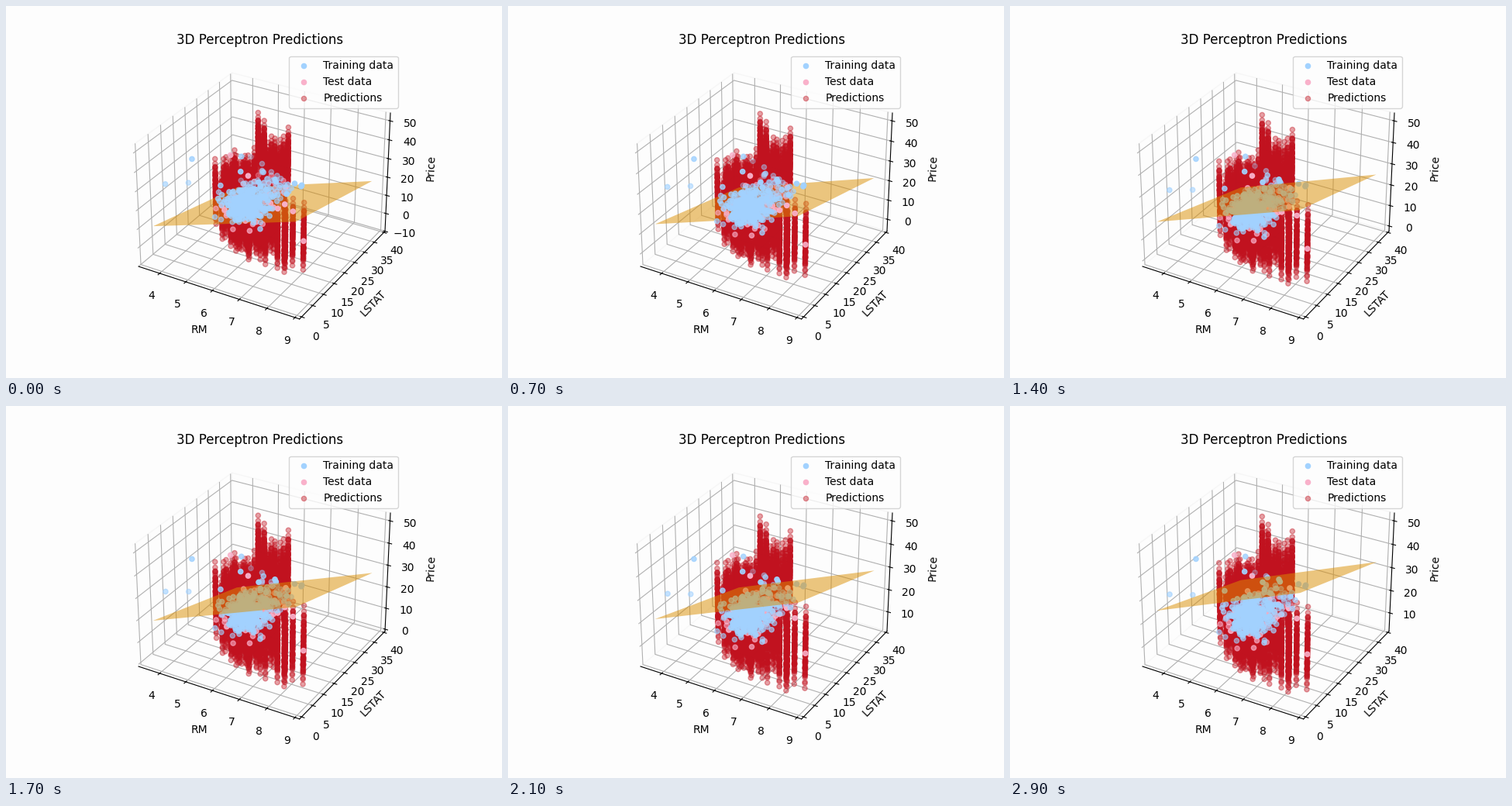
Write a matplotlib script that moves like this. It is 640x480 px and loops after 3 s.

```python
import numpy as np
import matplotlib.pyplot as plt
from matplotlib.animation import FuncAnimation
from mpl_toolkits.mplot3d.art3d import Poly3DCollection

FRAMES = 30
PAPER = "#fdfdfd"
BLUE, PINK, RED = "#a2d2ff", "#f9b1ca", "#c1121f"
AMBER = (0.86, 0.557, 0.0, 0.5)

RM = (3.561, 8.78)
LSTAT = (1.73, 37.97)
PRICE = (5.0, 50.0)
MARGIN = 0.05 + 1.1 / 48  # data margin plus view margin

rng = np.random.default_rng(12)


def padded(low, high):
    pad = (high - low) * MARGIN
    return low - pad, high + pad


def houses(count):
    """Random (rooms, status, price) rows with a housing-like correlation."""
    a, b = rng.standard_normal((2, count))
    rooms = np.clip(6.25 + 0.5 * a, 5.25, 7.5)
    status = np.clip(np.exp(2.4 - 0.3 * a + 0.43 * b), 2.5, 30)
    price = 5.1 * rooms - 0.64 * status - 1.4 + rng.normal(0, 4.2, count)
    price += 0.02 * (status - 12) ** 2
    return np.column_stack([rooms, status, np.clip(price, *PRICE)])


train_extra = [
    (3.561, 7.12, 27.5), (3.863, 13.33, 23.1), (4.97, 3.26, 50),
    (6.216, 9.53, 50), (8.725, 4.63, 50), (8.704, 5.12, 50),
    (8.398, 5.91, 48.8), (8.266, 4.14, 44.8), (7.929, 3.7, 50),
    (7.489, 1.73, 50), (6.683, 3.73, 50), (7.831, 4.45, 50),
    (4.138, 37.97, 13.8), (4.368, 30.63, 8.8), (4.652, 28.28, 10.5),
    (4.963, 14.0, 21.9), (4.88, 30.62, 10.2),
]
test_extra = [
    (5.012, 12.12, 15.3), (8.78, 5.29, 21.9), (5.875, 8.88, 50),
    (4.58, 36.2, 7), (5.05, 33.4, 7.4), (5.98, 33.3, 8.4),
    (6.17, 27.2, 14), (8.375, 5.6, 35), (8.337, 2.47, 41.7),
    (8.04, 3.13, 37.6), (8.247, 3.95, 48.3), (5.66, 12.0, 7),
    (7.61, 3.11, 42.3), (7.016, 2.96, 50),
]
train = np.vstack([houses(387), train_extra])
test = np.vstack([houses(88), test_extra])

# Every test house carries the whole set of predicted values as a column.
values = 6.9 + 34.6 * np.append(rng.beta(2.2, 2.4, 100), [0, 1])
col_x = np.repeat(test[:, 0], len(values))
col_y = np.repeat(test[:, 1], len(values))
col_z = np.tile(values, len(test))

fig = plt.figure(figsize=(6.4, 4.8), dpi=100, facecolor=PAPER)
ax = fig.add_subplot(projection="3d", computed_zorder=False)
ax.set_facecolor("none")
for axis in (ax.xaxis, ax.yaxis, ax.zaxis):
    axis.pane.set_facecolor(PAPER)
    axis.pane.set_edgecolor("#f0f0f0")

blue = ax.scatter(*train.T, color=BLUE, zorder=4, label="Training data")
pink = ax.scatter(*test.T, color=PINK, zorder=3, label="Test data")
red = ax.scatter(col_x, col_y, col_z, color=RED, alpha=0.4, zorder=1,
                 label="Predictions")


def plane_corners(k):
    rise = 0.495 * k
    left, right, back = 10.7 + rise, 19.0 + rise, -5.95 + rise
    front = left + right - back
    return [(RM[0], LSTAT[0], left), (RM[1], LSTAT[0], front),
            (RM[1], LSTAT[1], right), (RM[0], LSTAT[1], back)]


plane = Poly3DCollection([plane_corners(0)], facecolors=[AMBER], linewidths=0)
ax.add_collection3d(plane)

ax.set_title("3D Perceptron Predictions")
ax.set_xlabel("RM")
ax.set_ylabel("LSTAT")
ax.set_zlabel("Price")
ax.set_xticks(range(4, 10))
ax.set_yticks(range(0, 41, 5))
ax.set_xlim(*padded(*RM))
ax.set_ylim(*padded(*LSTAT))
ax.legend(loc="upper right", facecolor=PAPER)


def update(k):
    corners = plane_corners(k)
    plane.set_verts([corners])
    # The rising plane passes in front of the points part-way through.
    plane.set_zorder(2 if k < 12 else 4.5)
    low, high = padded(min(PRICE[0], corners[3][2]), PRICE[1])
    ax.set_zticks([t for t in range(-10, 51, 10) if low <= t <= high])
    ax.set_zlim(low, high)
    return ()


anim = FuncAnimation(fig, update, frames=FRAMES, interval=100, repeat=True,
                     repeat_delay=0, blit=False)
plt.show()
```
